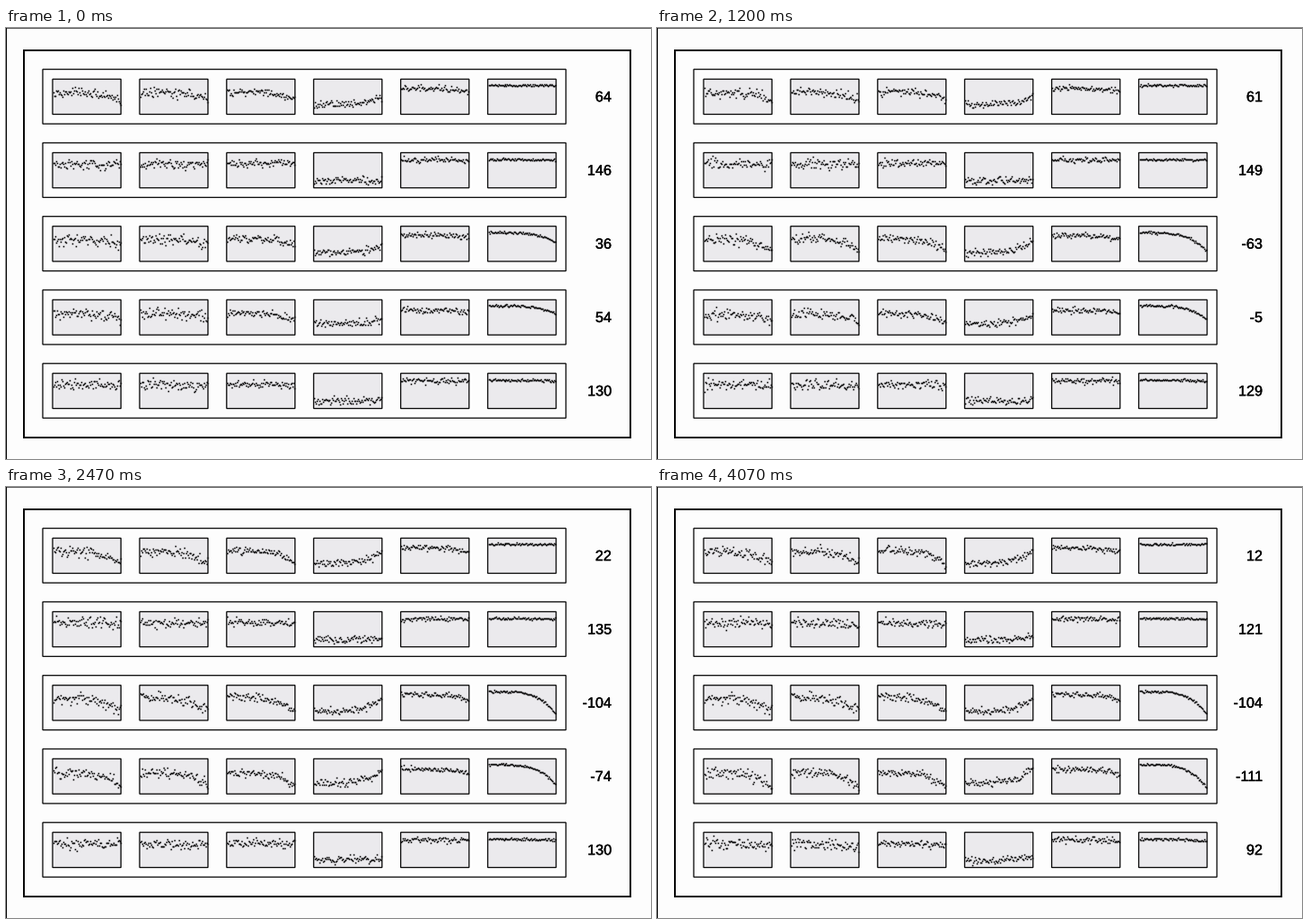
Recreate the animation shown at these times as a matplotlib script. Size 720 by 482 pixels, loop 4140 ms.

```python
import numpy as np
import matplotlib.pyplot as plt
from matplotlib.animation import FuncAnimation
from matplotlib.patches import Rectangle
from matplotlib.patheffects import withStroke

W, H, DPI = 720, 482, 64
PT = 72 / DPI  # points per pixel
LOOP_MS, TICK_MS = 4140, 20
STEPS_PER_MS = 0.015
STEPS, ROWS, COLS, POINTS = 62, 5, 6, 76
ROW_PITCH, COL_PITCH = 82.25, 97.15
HELD_STEPS = {16, 20, 25, 33, 60}

INK, PAPER, PANEL = "#080808", "#fdfdfd", "#ebeaed"

# Per column: dot height at the left, its shift with the row's lean,
# how far the right end bends as the score falls, and the scatter.
LEVEL = np.array([13.8, 13.6, 13.1, 29, 9.4, 7])
SHIFT = np.array([1.7, 1.2, 1.5, -2, 1.5, -0.5])
BEND = np.array([15, 15, 16, -15, 6, 24])
SPREAD = np.array([3.1, 2.9, 2.2, 2.2, 1.7, 0.7])

# Per row: lean, share of the bend carried by the last column, key scores.
KEY_STEPS = [0, 7, 13, 24, 37, 50, 61]
SEARCHES = [
    (0.5, 0.0, [64, 53, 64, 37, 22, 12, 12]),
    (-1.0, 0.3, [146, 159, 144, 151, 135, 130, 121]),
    (0.2, 1.0, [36, -6, -34, -83, -104, -104, -104]),
    (1.2, 1.0, [54, 21, 10, -27, -74, -111, -111]),
    (-0.9, 0.5, [130, 137, 115, 131, 130, 97, 92]),
]


def search(rng, lean, share, keys):
    """Return one row's scores (step) and dot heights (step, col, point)."""
    def draw_noise():
        return rng.normal(size=(COLS, POINTS)).clip(-2.6, 2.6)

    curve = np.linspace(0, 1, POINTS) ** 4
    weight = BEND * np.where(np.arange(COLS) < COLS - 1,
                             1.7 - 0.7 * share, share)
    settled = KEY_STEPS[keys.index(keys[-1])]
    noise = draw_noise()
    scores, heights = [], []
    for step in range(STEPS):
        if step in HELD_STEPS or step > settled:
            scores.append(scores[-1])
            heights.append(heights[-1])
            continue
        score = np.interp(step, KEY_STEPS, keys)
        if step not in KEY_STEPS:
            score += rng.normal() * 5
        noise = np.where(rng.random(POINTS) < 0.25, draw_noise(), noise)
        bend = weight * (150 - score) / 250
        y = ((LEVEL + lean * SHIFT)[:, None] + bend[:, None] * curve
             + SPREAD[:, None] * noise)
        scores.append(round(score))
        heights.append(y.clip(1.5, 38))
    return scores, heights


rng = np.random.default_rng(11)
scores, heights = zip(*(search(rng, *spec) for spec in SEARCHES))
heights = np.array(heights)

fig = plt.figure(figsize=(W / DPI, H / DPI), dpi=DPI, facecolor=PAPER)
ax = fig.add_axes([0, 0, 1, 1])
ax.set(xlim=(0, W), ylim=(H, 0))
ax.axis("off")


def box(x, y, w, h, line=1.3, fill="none"):
    ax.add_patch(Rectangle((x, y), w, h, facecolor=fill, edgecolor=INK,
                           linewidth=line * PT, joinstyle="miter",
                           snap=False))


ax.add_patch(Rectangle((0, 0), W, 1, facecolor="#666666", linewidth=0))
ax.add_patch(Rectangle((0, 0), 1, H, facecolor=INK, linewidth=0))
box(20, 25, 677, 433, line=2)

panel_x = 52 + COL_PITCH * np.arange(COLS)
panel_y = 57.2 + ROW_PITCH * np.arange(ROWS)
labels = []
for top in panel_y:
    box(41, top - 11, 584, 61)
    for left in panel_x:
        box(left, top, 76.3, 39.3, fill=PANEL)
    label = ax.text(676, top + 25, "", ha="right", va="baseline",
                    family="Liberation Sans", fontsize=16.3 * PT,
                    color="black")
    label.set_path_effects([withStroke(linewidth=0.35 * PT,
                                       foreground="black")])
    labels.append(label)

dot_x = panel_x[:, None] + np.linspace(0.8, 75.6, POINTS)
dot_x = np.broadcast_to(dot_x, (ROWS, COLS, POINTS)).ravel()
dots, = ax.plot(dot_x, dot_x, "s", color="black", markersize=1.6 * PT,
                markeredgewidth=0, zorder=3)


def draw(tick):
    time = tick * TICK_MS + TICK_MS / 2
    step = min(int((time + 5) * STEPS_PER_MS), STEPS - 1)
    dots.set_ydata((panel_y[:, None, None] + heights[:, step]).ravel())
    for label, row_scores in zip(labels, scores):
        label.set_text(str(row_scores[step]))
    return [dots, *labels]


anim = FuncAnimation(fig, draw, frames=LOOP_MS // TICK_MS, interval=TICK_MS,
                     repeat=True, repeat_delay=0, blit=False)
plt.show()
```
